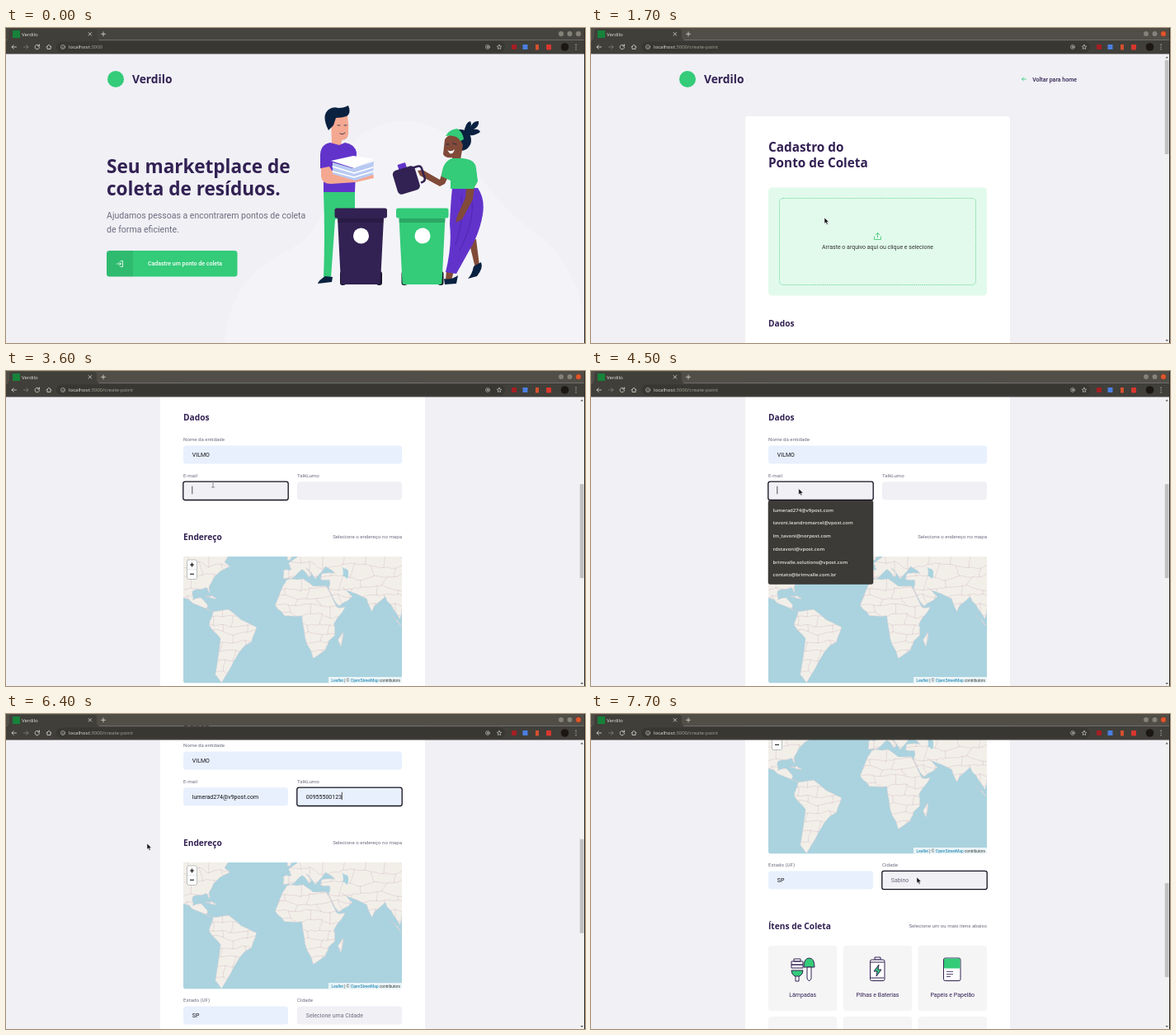
An HTML page for the animation above (8000 ms loop, 702 px wide and 382 px high).

```html
<!DOCTYPE html>
<html lang="pt-BR">
<head>
<meta charset="utf-8">
<title>Verdilo</title>
<style>
html, body { margin: 0; width: 100%; height: 100%; overflow: hidden; background: #f0f0f5; }
svg { display: block; width: 702px; height: 382px; }
text { font-family: Roboto, sans-serif; font-size: 7px; white-space: pre; }
.head { font-family: "Open Sans", "Noto Sans", sans-serif; font-weight: 700; fill: #322153; }
.brand { font-size: 13.8px; }
.hero { font-size: 22.6px; }
.big { font-size: 15.3px; }
.mid { font-size: 10.2px; }
.lead { font-size: 10.55px; fill: #6c6c80; }
.ui { font-family: "Open Sans", "Noto Sans", sans-serif; font-size: 6.1px; fill: #e6e4dd; }
.row { font-weight: 600; font-size: 6px; }
.label { font-size: 6.15px; fill: #6c6c80; }
.osm { font: 4.8px "Liberation Sans", Arial, sans-serif; fill: #333; }
.osm tspan { fill: #0078a8; }
.line { fill: none; stroke-linecap: round; stroke-linejoin: round; }
</style>
</head>
<body>
<svg viewBox="0 0 702 382">
  <rect width="702" height="382" fill="#f0f0f5"/>

  <g id="home">
    <path d="M265 382C270 320 300 290 345 268C405 235 385 165 430 130C468 102 525 108 555 150C585 200 610 225 650 255Q702 300 702 382Z" fill="#f4f4f8"/>
    <circle cx="133" cy="62" r="10" fill="#34cb79"/>
    <text class="head brand" x="153" y="67">Verdilo</text>
    <text class="head hero" x="122" y="176">Seu marketplace de</text>
    <text class="head hero" x="122" y="203">coleta de resíduos.</text>
    <text class="lead" x="122" y="231">Ajudamos pessoas a encontrarem pontos de coleta</text>
    <text class="lead" x="122" y="248">de forma eficiente.</text>
    <rect id="button" x="122" y="270" width="158.500" height="31.500" rx="3.500"/>
    <path d="M154 270h-28.500q-3.500 0-3.500 3.500v24.500q0 3.500 3.500 3.500h28.500z" opacity=".08"/>
    <path class="line" d="M139 282.500h2.500v7h-2.500M134.500 286h5m-2-2 2 2-2 2" stroke="#fff" stroke-width=".8"/>
    <text x="217" y="288.400" text-anchor="middle" fill="#fff" font-weight="500">Cadastre um ponto de coleta</text>

    <!-- man -->
    <path d="M385 198h38v30l-24 4-5 71h-9q2-50 0-105z" fill="#34cb79"/>
    <path d="M387 301l9 1-1 6-17 2q1-4 9-9z" fill="#0b2140"/>
    <path d="M394 106h20q2 12 1 23-1 7-8 7l-1 8h-11z" fill="#f4a891"/>
    <path d="M391 124q-9-18 0-25 5-4 12-2 7 0 12-3 4 9-2 13-6 2-13 2l-3 9z" fill="#0b2140"/>
    <path class="line" d="M402 118h3M410 118h3M405 128q4 2 6-1" stroke="#0b2140" stroke-width=".8"/>
    <path d="M393 139q-12 2-12 16v15l4 2v27h38l2-48q-2-10-14-12l-7 3z" fill="#6233cb"/>
    <path d="M382 170l10-2 6 9 26 2 21-3 1 6-22 5-30 2q-11 0-12-9z" fill="#f4a891"/>
    <path d="M396 163l24 7 26-8-1 16-22 7-27-8z" fill="#b9caf2"/>
    <path d="M394 161l27-6 25 4-24 11z" fill="#fff"/>
    <path class="line" d="M396 168l26 8 23-7M396 174l26 7 23-7" stroke="#fff" stroke-width="1.500"/>

    <!-- woman -->
    <path d="M561 258l9-2 4 32-5 3z" fill="#814a39"/>
    <path d="M534 294l9 1-3 11-7-1z" fill="#814a39"/>
    <path d="M531 304q8 2 17-4l-2 10-14 1zM567 289l9-5q3 7-5 17l-11 3q5-5 7-15z" fill="#0b2140"/>
    <path d="M541 194h31q9 13 6 32-4 24-17 45l-15 27-13-2q8-32 5-58 1-26 3-44z" fill="#6233cb"/>
    <path class="line" d="M564 205q6 25-14 65M552 203q4 30-7 60" stroke="#4a22a6" stroke-width=".8"/>
    <path d="M530 172l-4 12-21-12-6 1 3 6 24 13 6-3 6-13zM559 182l10 1-3 25-13 24-8 4 2-8 10-22z" fill="#814a39"/>
    <circle cx="551" cy="136" r="13" fill="#0b2140"/>
    <path d="M555 128q2-14 8-15 2 4 0 7 4-8 10-7 1 6-6 10 6-1 8 3-6 5-14 4z" fill="#0b2140"/>
    <path d="M532 135q6-8 16-6l6 13-3 18-10 2v-5q-9 1-11-4z" fill="#814a39"/>
    <path d="M533 131q4-8 14-9 7 4 8 13l-4 2q-5-8-18-6z" fill="#34cb79"/>
    <path class="line" d="M534 141h3M542 140l4 1" stroke="#0b2140" stroke-width=".8"/>
    <path d="M535 148q5 3 9-1-2 7-6 5z" fill="#fff"/>
    <path d="M541 158h12q16 1 17 12l2 16-5 9h-28v-10l-11-5q1-18 13-22z" fill="#34cb79"/>
    <g transform="rotate(-17 487 183)">
      <rect x="480" y="163" width="10" height="8" rx="1" fill="#6233cb"/>
      <rect x="471" y="169" width="28" height="30" rx="5" fill="#322153"/>
      <path class="line" d="M497 172h6q4 0 4 4v12q0 4-5 4" stroke="#322153" stroke-width="2.500"/>
    </g>

    <g id="bin">
      <rect x="405" y="295" width="7" height="17" rx="3" fill="#151326"/>
      <rect x="449" y="295" width="7" height="17" rx="3" fill="#151326"/>
      <path d="M402 230h56l-4 79q0 2-3 2h-42q-3 0-3-2z"/>
      <path d="M402 231h56v5h-56z" fill="#000" opacity=".18"/>
      <rect x="398.500" y="218.500" width="63.500" height="12" rx="2.500"/>
      <circle cx="430.500" cy="252" r="9.500" fill="#fff"/>
    </g>
  </g>

  <g id="form"></g>

  <g id="bar">
    <rect x="695" y="31" width="7" height="351" fill="#f1f1f1"/>
    <rect id="thumb" x="695.800" width="4.700" height="114" fill="#c1c1c1"/>
    <path d="M696.500 36.500l1.700-2 1.700 2zM696.500 378l1.700 2 1.700-2z" fill="#555"/>
  </g>

  <!-- browser frame -->
  <rect id="strip" width="702" height="14.500"/>
  <path d="M0 14.500q4 0 4-4V4q0-3 3-3h100q3 0 3 3v6.500q0 4 4 4h588v17H0z" fill="#403f3a"/>
  <rect x="61" y="16.500" width="544" height="13" rx="6.500" fill="#383732"/>
  <rect x="8" y="3" width="9" height="9" fill="#16823a"/>
  <text class="ui" x="19" y="9.600">Verdilo</text>
  <g class="line" stroke="#dedbd2" stroke-width=".8">
    <path d="M100 5.500l3.600 3.600m0-3.600L100 9.100M115.500 7.300h5M118 4.800v5M7 23h5.500M9.300 20.700 7 23l2.300 2.300"/>
    <path d="M21.500 23H27m-2.300-2.300L27 23l-2.300 2.300" stroke="#85827a"/>
    <path d="M40 21.500a2.700 2.700 0 1 0 .5 2M40.500 20v2h-2M49 23l3-2.700 3 2.700M50 22.500v3h4v-3"/>
    <path d="M598 20.300l.8 1.800 2 .2-1.500 1.300.4 2-1.700-1-1.700 1 .4-2-1.500-1.300 2-.2zM69 22.700v1.500" stroke-width=".6"/>
    <circle cx="69" cy="23" r="2.500" stroke-width=".6"/>
    <circle cx="584" cy="23" r="2.400" stroke-width=".6"/><circle cx="584" cy="23" r=".5"/>
  </g>
  <text class="ui" x="76" y="25.200">localhost<tspan id="path" fill="#a9a69c"></tspan></text>
  <rect x="613" y="20" width="6" height="6" rx="1" fill="#a51e22"/>
  <rect x="626.500" y="20" width="6" height="6" fill="#4a7fe0"/>
  <rect x="642" y="20" width="4" height="6.500" fill="#d5502f"/>
  <rect x="655" y="20" width="6" height="6.500" rx="1" fill="#d8372e"/>
  <circle cx="677.500" cy="23" r="4.800" fill="#1c1712"/>
  <path d="M691 20.200h.1M691 23h.1M691 25.800h.1" class="line" stroke="#dedbd2" stroke-width="1.200"/>
  <g fill="#85827a" stroke="#33322e" stroke-width=".5">
    <circle cx="673" cy="7" r="3.500"/><circle cx="683.500" cy="7" r="3.500"/><circle id="close" cx="694" cy="7" r="3.500"/>
  </g>
  <rect x="701" width="1" height="382" fill="#2b2a27"/>

  <g id="cursor">
    <path id="arrow" d="M0 0v7.200l1.700-1.500 1.200 2.700 1.300-.6-1.200-2.600h2.400z" fill="#111" stroke="#fff" stroke-width=".5"/>
    <path id="hand" d="M-.8 0h1.400v3l3.400.8v2.700l-1 2h-3.800l-2.200-3.500 1-.6 1.200 1z" fill="#fff" stroke="#111" stroke-width=".6"/>
    <path id="beam" class="line" d="M-1.500-4h3M0-4v7M-1.500 3h3" stroke="#777" stroke-width=".8"/>
  </g>
</svg>

<script>
const $ = id => document.getElementById(id);
const rect = (x, y, w, h, fill, more = '') =>
  `<rect x="${x}" y="${y}" width="${w}" height="${h}" fill="${fill}" ${more}/>`;
const text = (x, y, s, cls = '', more = '') => `<text x="${x}" y="${y}" class="${cls}" ${more}>${s}</text>`;
const end = 'text-anchor="end"', mid = 'text-anchor="middle"';

let seed = 7;
const jitter = size => {
  seed = (seed * 16807) % 2147483647;
  return (seed / 2147483647 - .5) * 2 * size;
};

// Mercator map from a few "lon,lat" key points, with roughened coasts
const project = ([lon, lat]) => {
  const y = 603.7 - 71.5 * Math.log(Math.tan(Math.PI / 4 + lat * Math.PI / 360));
  return (347.5 + 1.249 * lon).toFixed(1) + ' ' + y.toFixed(1);
};
const mix = (a, b, k, rough) => a.map((v, i) => v + (b[i] - v) * k + jitter(rough));
const outline = keys => {
  const pts = keys.split(' ').map(p => p.split(',').map(Number));
  return 'M' + pts.flatMap((p, i) => {
    const next = pts[(i + 1) % pts.length];
    return [p, mix(p, next, .33, .7), mix(p, next, .67, .7)];
  }).map(project).join('L') + 'Z';
};
const land = [
  '-6,36 10,37 20,31 33,31 43,12 51,12 40,-4 41,-15 35,-20 32,-28 20,-35 12,-17 9,4 -8,4 -17,14 -10,30',
  '-77,8 -62,10 -50,0 -35,-7 -40,-21 -48,-26 -57,-37 -69,-52 -75,-47 -70,-18 -81,-5',
  '-110,56 -57,56 -66,49 -61,46 -74,40 -81,31 -80,25 -84,30 -97,27 -97,19 -89,21 -83,15 -83,10 -77,8 -92,14 -106,21 -110,26',
  '-9,43 -1,44 -4,48 8,54 110,56 110,20 106,10 104,1 98,10 90,22 80,14 77,8 72,20 57,26 48,30 58,22 45,13 35,28 36,36 27,37 29,41 41,41 32,46 28,42 22,37 13,45 18,40 16,38 9,44 -2,37 -9,37',
  '49,-12 47,-25 44,-19', '-5,50 1,52 -4,56', '-85,22 -78,23 -74,20', '95,5 105,-6 102,-1'
].map(outline).join('');
const caspian = outline('48,46 54,43 53,37 49,39');

// Country borders: a brick pattern of jittered nodes, cut off at the coasts
function borders() {
  const nodes = Array.from({ length: 22 }, (_, i) => Array.from({ length: 14 }, (_, j) =>
    [i * 10.5 - 110 + jitter(3.5), j * 8.5 - 55 + jitter(3)]));
  const edge = (a, b) => 'M' + [a, mix(a, b, .33, .8), mix(a, b, .67, .8), b].map(project).join('L');
  let d = '';
  for (let i = 0; i < 21; i++) for (let j = 0; j < 13; j++) {
    d += edge(nodes[i][j], nodes[i + 1][j]);
    if ((i + j) % 2) d += edge(nodes[i][j], nodes[i][j + 1]);
  }
  return d;
}
const map = `<clipPath id="frame">${rect(215, 527, 265, 153.6, '#000', 'rx="3"')}</clipPath>
  <clipPath id="coast"><path d="${land}"/></clipPath>
  <g clip-path="url(#frame)">${rect(215, 527, 265, 153.6, '#aad3df')}
    <path d="${land}" fill="#f2efe9" stroke="#d8c8cf" stroke-width=".4"/>
    <path d="${borders()}" class="line" stroke="#d3bcc5" stroke-width=".45" clip-path="url(#coast)"/>
    <path d="${caspian}" fill="#aad3df"/>
    ${rect(391, 673, 89, 8, '#fff', 'opacity=".75"')}
    ${text(478, 678.6, '<tspan>Leaflet</tspan> | © <tspan>OpenStreetMap</tspan> contributors', 'osm', end)}
  </g>
  ${rect(219.5, 531, 12, 23.5, '#fff', 'rx="2" stroke="#a9b0b0" stroke-width=".8"')}
  <path d="M219.500 542.700h12" stroke="#ccc" stroke-width=".5"/>
  <path d="M223 537h5m-2.500-2.500v5M223 548.200h5" stroke="#000" stroke-width="1.100"/>`;

const title = (y, s) => text(215, y, s, 'head mid');
const hint = (y, s) => text(480, y, s, 'label', end);
const field = (id, label, x, y, w, value = '', fill = '#f0f0f5') =>
  text(x, y - 5.3, label, 'label') + rect(x, y, w, 22, fill, `rx="3.500" id="${id}Box"`) +
  rect(x - .2, y - .2, w + .4, 22.4, 'none', `rx="2.500" stroke="#14101f" stroke-width="1.300" id="${id}Ring" visibility="hidden"`) +
  text(x + 10.8, y + 13.4, value, '', `id="${id}" fill="#111"`);
const menu = (id, x, y, w, rows) => `<g id="${id}Menu">` +
  rect(x, y, w, rows.length * 15.75 + 7, '#3c3b37', 'rx="2" stroke="#2c2b28" stroke-width=".5"') +
  rows.map((s, i) => text(x + 5.5, y + 13.5 + i * 15.75, s, 'ui row')).join('') + '</g>';

const cities = 'Ribeirão Preto,Rifaina,Rincão,Rinópolis,Rio Claro,Rio das Pedras,Riolândia,Rosana,Roseira,Rubiácea,Rubinéia,Sabino,Sagres,Sales,Salmourão,Saltinho,Salto,Sandovalina,Santa Adélia,Santos'.split(',');
const email = 'lumerad274@v9post.com', phone = '00955500123';
const cards = ['Lâmpadas', 'Pilhas e Baterias', 'Papéis e Papelão'].map((s, i) => {
  const x = 215 + i * 90.8;
  return [792, 878].map(y => rect(x, y, 83.4, 79, '#f5f5f5', 'rx="3.500"')).join('') +
    text(x + 41.7, 854, s, '', mid + ' fill="#322153"');
}).join('');
const icons = `<g transform="translate(0 511)" stroke="#322153" fill="#fff">
  <path d="M246 297h8v3h-8zM243 300h14v4h-14zM243 304h14v4h-14zM248 317h4v7h-4z"/>
  <path d="M243 311h14l-1 4-3 3h-6l-3-3zM258 307q0-11 6.500-11t6.500 11z" fill="#34cb79"/>
  <path d="M262 307h5v14l-2.500 3-2.500-3zM344 295h7v3h-7z"/>
  <rect x="338.500" y="298" width="17.500" height="25.500" rx="2"/><path d="M339 301h16.500M339 320h16.500"/>
  <path d="M349 304l-6 8h4l-1 6 6-8h-4z" fill="#34cb79"/>
  <rect x="427.500" y="296" width="20.500" height="27.500" rx="2"/>
  <rect x="428" y="296.500" width="19.500" height="12" rx="1.500" fill="#34cb79" stroke="none"/>
  <path d="M431 312.500h8M431 315.500h8M431 318.500h5" stroke-width=".8"/></g>`;

$('form').innerHTML = `
  <circle cx="117" cy="62" r="10" fill="#34cb79"/>${text(137, 67, 'Verdilo', 'head brand')}
  <path d="M527.500 62h-5m2-2-2 2 2 2" class="line" stroke="#34cb79" stroke-width=".8"/>
  ${text(589, 64.6, 'Voltar para home', '', end + ' fill="#322153" font-weight="500"')}
  ${rect(187, 107, 321, 960, '#fff', 'rx="3.500"')}
  ${text(215, 150, 'Cadastro do', 'head big')}${text(215, 168.5, 'Ponto de Coleta', 'head big')}
  ${rect(215, 193.5, 265, 131, '#e1faec', 'rx="4.400"')}
  ${rect(228.5, 206.5, 238, 105, 'none', 'rx="4.400" stroke="#4ecb79" stroke-width=".7" stroke-dasharray="1.400 1"')}
  <path d="M343.500 253v3.500h8V253M347.500 254v-5.500m-2.300 2.300 2.300-2.300 2.300 2.300" class="line" stroke="#4ecb79" stroke-width=".9"/>
  ${text(347.5, 268, 'Arraste o arquivo aqui ou clique e selecione', '', mid + ' fill="#333"')}
  ${title(362, 'Dados')}
  ${field('name', 'Nome da entidade', 215, 392.5, 265)}
  ${field('mail', 'E-mail', 215, 436.3, 127)}
  ${field('phone', 'TalkLumo', 353, 436.3, 127)}
  ${title(507, 'Endereço')}${hint(505, 'Selecione o endereço no mapa')}
  ${map}
  ${field('state', 'Estado (UF)', 215, 701.5, 127, 'SP', '#e8f0fe')}
  ${field('city', 'Cidade', 353, 701.5, 127)}
  ${title(772, 'Ítens de Coleta')}${hint(770, 'Selecione um ou mais itens abaixo')}
  ${cards}${icons}
  ${menu('name', 215, 415.5, 265, ['VILMO', 'Tavoni', 'Brimvalle', 'Vilmo Coletas', 'Leandro Tavoni', 'Brimvalle Coletas'])}
  ${menu('mail', 215, 459, 127, [email, 'tavoni.leandromarcel@vpost.com', 'lm_tavoni@norpost.com',
    'rdstavoni@vpost.com', 'brimvalle.solutions@vpost.com', 'contato@brimvalle.com.br'])}
  ${menu('phone', 353, 459, 127, [phone, '00955500187', '00955500164'])}
  <g id="cityMenu">${rect(353, 724, 127, 157, '#f0f0f5', 'stroke="#999" stroke-width=".6"')}
    ${rect(353, 810.4, 127, 7.85, '#cfcfd8')}
    ${cities.map((s, i) => text(356, 730 + i * 7.85, s, '', 'fill="#6c6c80"')).join('')}</g>
  <path id="caret" d="M0-8v9.500" stroke="#111" stroke-width=".7"/>`;
$('city').setAttribute('fill', '#6c6c80');

// Second bin is a green copy of the first
const bin = $('bin').cloneNode(true);
$('bin').setAttribute('fill', '#322153');
bin.removeAttribute('id');
bin.setAttribute('fill', '#34cb79');
bin.setAttribute('transform', 'translate(74.500 0)');
$('home').append(bin);

// Pointer rests: [arrival, x, y, shape]; each move before one takes 400 ms at most
const rests = [
  [100, 330, 215], [600, 235, 288, 'hand'], [1700, 283, 230], [2300, 206, 170], [3000, 250, 101, 'beam'],
  [3300, 250, 124], [3600, 251, 138, 'beam'], [4800, 256, 168], [5200, 442, 136, 'beam'],
  [5700, 420, 167], [6300, 171, 157], [7200, 395, 198]
];
// [start, end, distance]
const scrolls = [[1900, 2400, 302], [6200, 6400, 45], [6400, 6800, 164]];
// [field, focus, menu opens, value set, blur, value]
const steps = [
  ['name', 3000, 3100, 3400, 3600, 'VILMO'], ['mail', 3600, 3900, 4800, 5400, email],
  ['phone', 5400, 5500, 5700, 7200, phone], ['city', 7200, 7200, 7500, 8000, 'Sabino']
];

const ramp = (t, a, b) => Math.min(1, Math.max(0, (t - a) / (b - a)));
const show = (id, on) => $(id).setAttribute('visibility', on ? 'visible' : 'hidden');
const move = (id, x, y) => $(id).setAttribute('transform', `translate(${x} ${y})`);
const fill = (id, color) => $(id).setAttribute('fill', color);

function drawPointer(t, onForm) {
  const n = Math.max(0, rests.findLastIndex(r => r[0] <= t));
  const from = rests[n], to = rests[n + 1] || from;
  const k = ramp(t, Math.max(from[0], to[0] - 400), to[0] + .1);
  const ease = k * k * (3 - 2 * k);
  const shape = k > 0 && n < rests.length - 1 || onForm && from[3] === 'hand' ? 'arrow' : from[3] || 'arrow';
  for (const id of ['arrow', 'hand', 'beam']) show(id, t >= 100 && id === shape);
  move('cursor', from[1] + (to[1] - from[1]) * ease, from[2] + (to[2] - from[2]) * ease);
}

function drawField(t, [id, focus, open, set, blur, value]) {
  const focused = t >= focus && t < blur, filled = t >= set;
  show(id + 'Ring', focused);
  show(id + 'Menu', t >= open && !filled);
  $(id).textContent = filled ? value : id === 'city' ? 'Selecione uma Cidade' : '';
  if (id === 'city') return;
  fill(id + 'Box', filled ? '#e8f0fe' : '#f0f0f5');
  if (!focused) return;
  show('caret', true);
  move('caret', +$(id).getAttribute('x') + (filled ? $(id).getComputedTextLength() + .3 : 0), $(id).getAttribute('y'));
}

function draw(now) {
  const t = Math.floor(now % 8000 / 100) * 100;
  const onForm = t >= 1100, active = t >= 1000;
  const scroll = scrolls.reduce((sum, [a, b, by]) => sum + by * ramp(t, a, b), 0);
  $('home').style.display = onForm ? 'none' : '';
  $('form').style.display = $('bar').style.display = onForm ? '' : 'none';
  $('path').textContent = onForm ? ':3000/create-point' : ':3000';
  fill('strip', active ? '#504e47' : '#45443e');
  fill('close', active ? '#e0562b' : '#85827a');
  fill('button', t >= 600 ? '#2fb86e' : '#34cb79');
  move('form', 0, -scroll);
  $('thumb').setAttribute('y', 39 + scroll * .325);
  show('caret', false);
  steps.forEach(step => drawField(t, step));
  drawPointer(t, onForm);
}

const start = performance.now();
function loop() {
  draw(performance.now() - start);
  requestAnimationFrame(loop);
}
loop();
</script>
</body>
</html>
```
